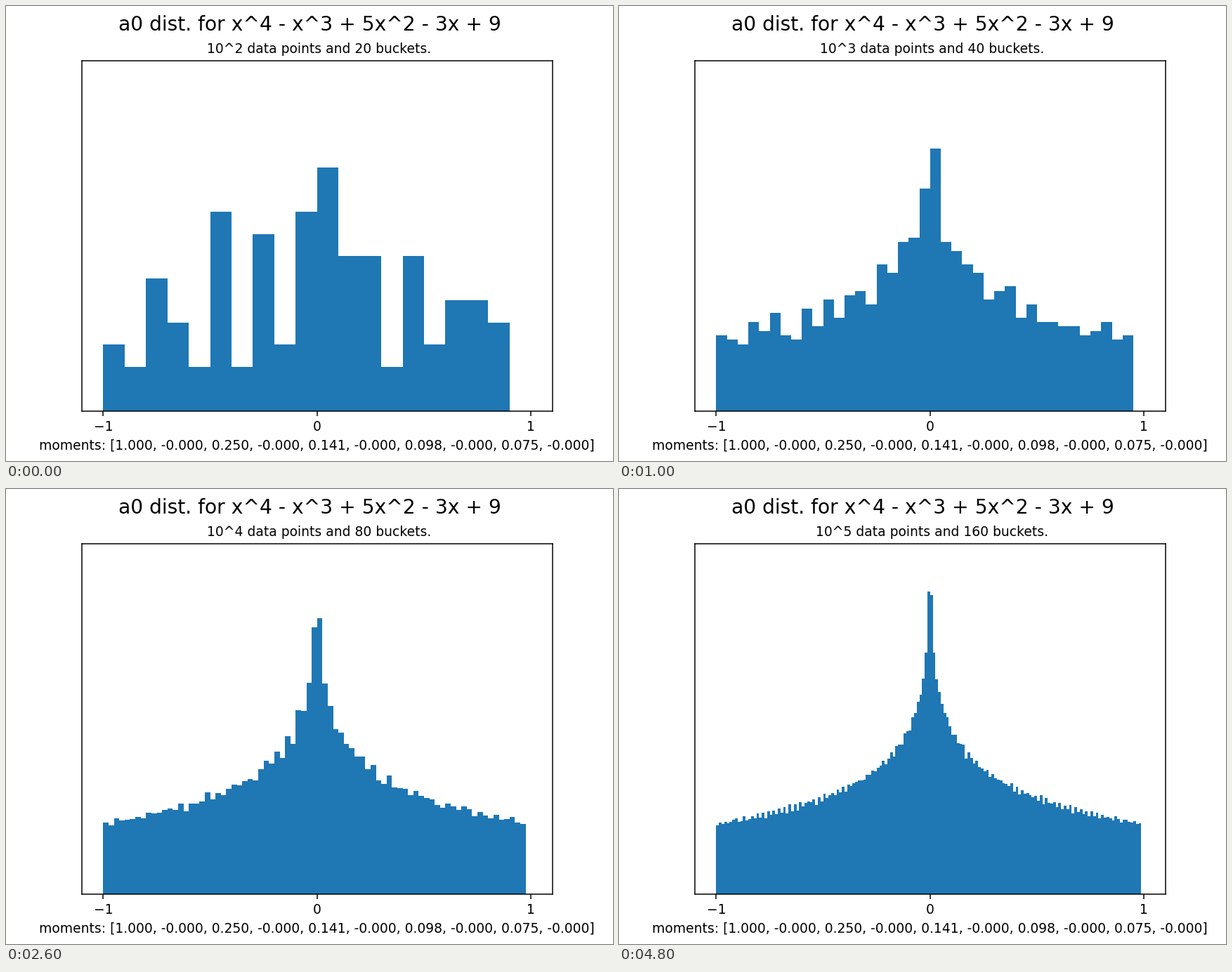
Animation, 864 px wide and 648 px high, one loop 6 s. Source, as a matplotlib script:

```python
import numpy as np
import matplotlib.pyplot as plt
from matplotlib.animation import FuncAnimation

plt.rcParams["font.family"] = "DejaVu Sans"

STAGES = 4
FRAMES = 6  # the last stage is held until the loop ends
MOMENTS = [1, -0.0, 0.25, -0.0, 0.141, -0.0, 0.098, -0.0, 0.075, -0.0]

# Root angles of the polynomial: x + 3/x = (1 ± √5) / 2 with |x| = √3.
ANGLES = np.arccos((1 + np.array([1, -1]) * np.sqrt(5)) / (4 * np.sqrt(3)))


def normalized_traces(count):
    powers = np.arange(1, count + 1)
    return np.cos(np.outer(ANGLES, powers)).mean(axis=0)


def make_stage(index):
    exponent, buckets = index + 2, 20 * 2**index
    edges = np.arange(-1, 1, 2 / buckets)
    density, _ = np.histogram(normalized_traces(10**exponent), edges, density=True)
    caption = f" 10^{exponent} data points and {buckets} buckets."
    return edges, density, caption


stages = [make_stage(i) for i in range(STAGES)]

fig, ax = plt.subplots(figsize=(6.4, 4.8), dpi=135)
fig.suptitle("a0 dist. for x^4 - x^3 + 5x^2 - 3x + 9", fontsize=15)


def draw(frame):
    edges, density, caption = stages[min(frame, STAGES - 1)]
    ax.clear()
    ax.bar(edges[:-1], density, width=np.diff(edges), align="edge", color="#1f77b4")
    ax.set(xlim=(-1.1, 1.1), ylim=(0, 1.6), xticks=[-1, 0, 1], yticks=[])
    ax.set_title(caption, fontsize=10)
    ax.set_xlabel("moments: [" + ", ".join(f"{m:.3f}" for m in MOMENTS) + "]")


animation = FuncAnimation(fig, draw, frames=FRAMES, interval=1000,
                          init_func=lambda: None, repeat=True, repeat_delay=0)
plt.show()
```
